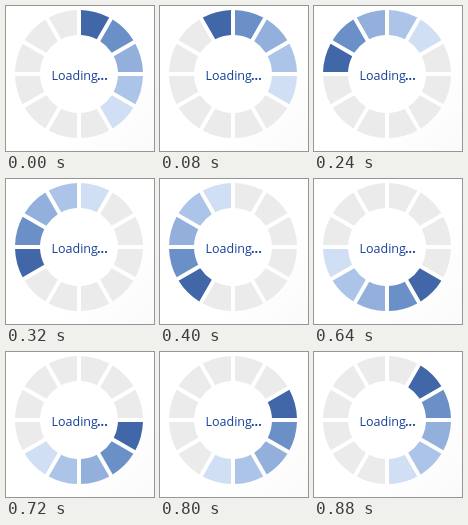
An HTML page for the animation above (960 ms loop, 148 by 145 pixels).

```html
<!DOCTYPE html>
<html>
<head>
<meta charset="utf-8">
<style>
  html, body { margin: 0; width: 100%; height: 100%; overflow: hidden; background: #fff; }
  svg { display: block; }
  text { font: 12.5px "Open Sans", "Noto Sans", sans-serif; fill: #17409a; }
  .dots { font-weight: 700; }
</style>
</head>
<body>
<svg width="148" height="145" viewBox="0 0 148 145">
  <defs>
    <linearGradient id="shade" x1="0" y1="0" x2="1" y2="1">
      <stop offset=".65" stop-color="#fff"/>
      <stop offset="1" stop-color="#fafafa"/>
    </linearGradient>
  </defs>
  <rect width="148" height="145" fill="url(#shade)"/>
  <g id="ring" transform="translate(73 68)"></g>
  <text x="45.5" y="74">Loading</text>
  <text class="dots" x="91" y="74">...</text>
</svg>
<script>
const COUNT = 12, STEP = 80, OUTER = 64, INNER = 39, HALF_GAP = 2;
const TAIL = ['#4267a8', '#6b90c8', '#93b0dc', '#abc4e7', '#d0dff3'];
const IDLE = '#ebebeb';
const ring = document.getElementById('ring');

// Point on a circle, offset sideways from the spoke at the given angle.
function point(radius, angle, offset) {
  const along = Math.sqrt(radius * radius - offset * offset);
  const s = Math.sin(angle), c = Math.cos(angle);
  return `${along * s + offset * c} ${offset * s - along * c}`;
}

const segments = Array.from({ length: COUNT }, (_, i) => {
  const from = i * 2 * Math.PI / COUNT, to = from + 2 * Math.PI / COUNT;
  const path = document.createElementNS('http://www.w3.org/2000/svg', 'path');
  path.setAttribute('d', `M${point(INNER, from, HALF_GAP)} L${point(OUTER, from, HALF_GAP)}
    A${OUTER} ${OUTER} 0 0 1 ${point(OUTER, to, -HALF_GAP)} L${point(INNER, to, -HALF_GAP)}
    A${INNER} ${INNER} 0 0 0 ${point(INNER, from, HALF_GAP)}Z`);
  return ring.appendChild(path);
});

function draw() {
  const step = Math.floor(performance.now() / STEP) % COUNT;
  segments.forEach((path, i) => path.setAttribute('fill', TAIL[(i + step) % COUNT] || IDLE));
  requestAnimationFrame(draw);
}
draw();
</script>
</body>
</html>
```
